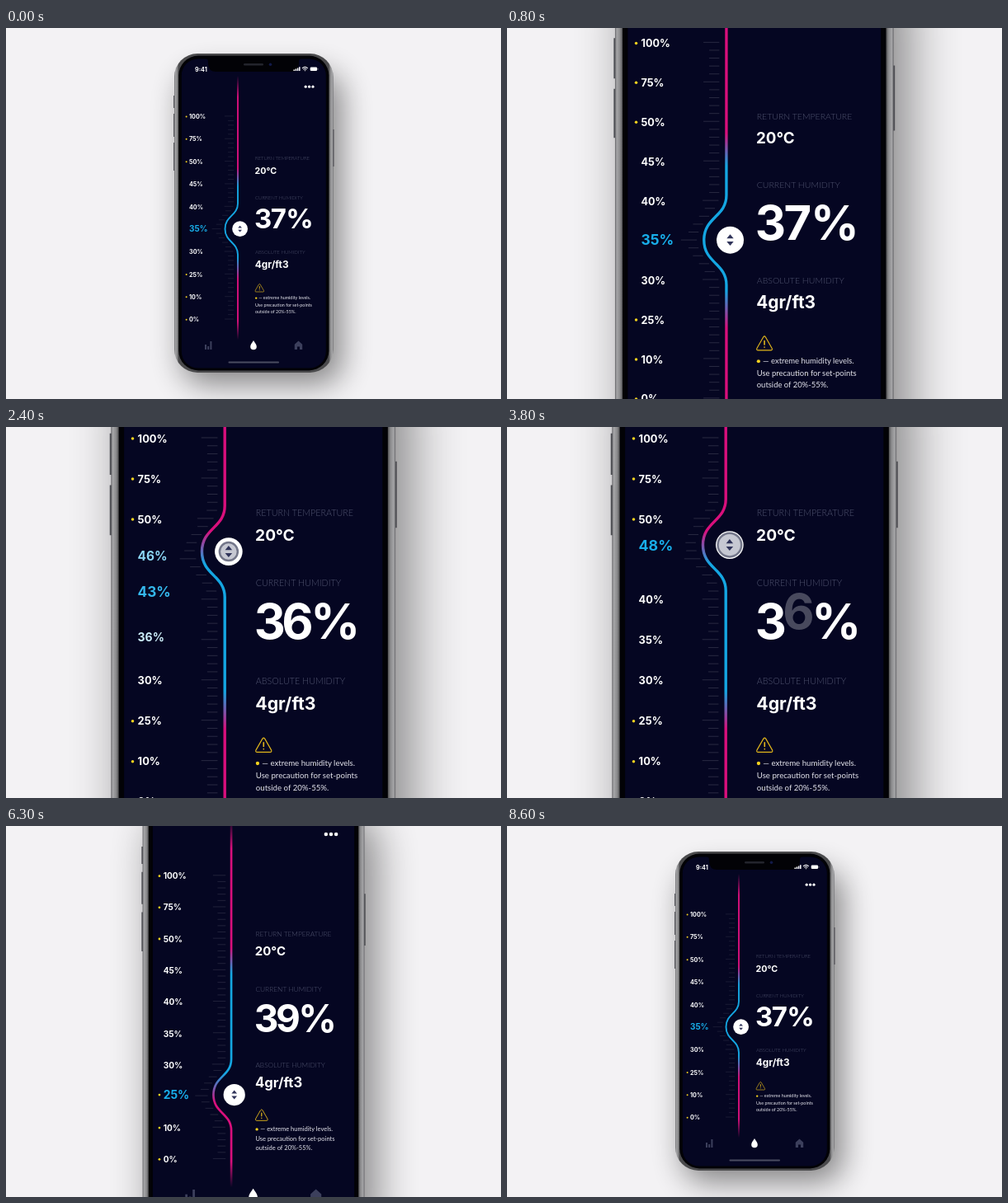
Write an HTML page that moves like this. It is 600x450 px and loops after 9 s.

```html
<!DOCTYPE html>
<html lang="en">
<head>
<meta charset="utf-8">
<title>Humidity control</title>
<style>
  html, body { margin: 0; width: 100%; height: 100%; overflow: hidden; background: #f3f2f4; }
  svg { display: block; width: 100vw; height: 100vh; }
  text { font-family: Inter, sans-serif; font-weight: 700; fill: #fff; }
  .cap { font: 300 6px Lato, sans-serif; fill: #50546f; }
  .note { font: 400 5.4px Lato, sans-serif; fill: #e4e4ec; }
  .big { font-size: 33px; }
  .label { font-size: 7.2px; }
  .dim { fill: #3c3f5c; }
</style>
</head>
<body>
<svg viewBox="0 0 600 450">
  <defs>
    <linearGradient id="metal">
      <stop offset="0" stop-color="#626266"/>
      <stop offset=".006" stop-color="#a6a6a8"/>
      <stop offset=".018" stop-color="#8a8a8c"/>
      <stop offset=".028" stop-color="#4a4a4c"/>
      <stop offset=".972" stop-color="#4a4a4c"/>
      <stop offset=".982" stop-color="#8a8a8c"/>
      <stop offset=".994" stop-color="#a6a6a8"/>
      <stop offset="1" stop-color="#626266"/>
    </linearGradient>
    <linearGradient id="heat" gradientUnits="userSpaceOnUse" x1="0" y1="58" x2="0" y2="378">
      <stop offset="0" stop-color="#d90f7c" stop-opacity="0"/>
      <stop offset=".08" stop-color="#d90f7c"/>
      <stop offset=".35" stop-color="#d90f7c"/>
      <stop offset=".42" stop-color="#14a6e2"/>
      <stop offset=".69" stop-color="#14a6e2"/>
      <stop offset=".77" stop-color="#d90f7c"/>
      <stop offset=".93" stop-color="#d90f7c"/>
      <stop offset="1" stop-color="#d90f7c" stop-opacity="0"/>
    </linearGradient>
    <filter id="blur" x="-50%" y="-30%" width="200%" height="160%">
      <feGaussianBlur stdDeviation="18"/>
    </filter>
  </defs>
  <rect width="600" height="450" fill="#f3f2f4"/>
  <g id="camera">
    <rect x="213" y="54" width="194" height="378" rx="28" fill="#000" opacity=".45" filter="url(#blur)"/>
    <path d="M203.8 82v15M203.8 104v28M203.8 139v34M396.8 123v45" stroke="#4c4d52" stroke-width="1.4"/>
    <rect x="204" y="31" width="192.6" height="387" rx="28" fill="url(#metal)"/>
    <rect x="209.2" y="33.6" width="182.2" height="381.8" rx="24" fill="#020206"/>
    <rect x="212.8" y="37.5" width="175" height="375" rx="20" fill="#050622"/>
    <path d="M241 37h118q-4 0-4 4v2q0 10-10 10h-90q-10 0-10-10v-2q0-4-4-4z" fill="#020206"/>
    <rect x="288" y="43" width="24" height="2.4" rx="1.2" fill="#23242c"/>
    <circle cx="320.5" cy="44.2" r="1.8" fill="#121a48"/>

    <text x="229" y="52.6" font-size="7.2">9:41</text>
    <path d="M349.2 52v-1.6M351.4 52v-2.6M353.6 52v-3.6M355.8 52v-4.8" stroke="#fff" stroke-width="1.5"/>
    <path d="M359 48.9q3.4-3 6.8 0M360.4 50.4q2-1.7 4 0M361.9 51.6h1" fill="none" stroke="#fff" stroke-width="1.1"/>
    <rect x="368.7" y="47.4" width="8.4" height="4.6" rx="1.3" fill="#fff"/>
    <path d="M378 48.9v1.7" stroke="#aaa" stroke-width=".7"/>
    <g fill="#fff">
      <circle cx="363.2" cy="71.2" r="1.6"/><circle cx="367.6" cy="71.2" r="1.6"/><circle cx="372" cy="71.2" r="1.6"/>
    </g>

    <path id="ticks" fill="none" stroke="#fff" stroke-opacity=".16" stroke-width=".5"/>
    <path id="line" fill="none" stroke="url(#heat)" stroke-width="1.9"/>
    <g id="labels"></g>
    <g id="handle">
      <circle r="9.4" fill="#fff"/>
      <circle id="press" fill="#c6c8d2" stroke="#74778a"/>
      <path d="M-2.4-1.1L0-3.9L2.4-1.1zM-2.4 1.1L0 3.9L2.4 1.1z" fill="#30345a"/>
    </g>

    <text class="cap" x="302" y="160.1">RETURN TEMPERATURE</text>
    <text x="301.6" y="176.8" font-size="10.7">20°C</text>
    <text class="cap" x="302" y="207.7">CURRENT HUMIDITY</text>
    <text class="big" x="300.9" y="243.4">3</text>
    <text class="big" id="digit" x="330.3" text-anchor="middle"></text>
    <text class="big" x="339.2" y="243.4">%</text>
    <text class="cap" x="302" y="273.9">ABSOLUTE HUMIDITY</text>
    <text x="301.7" y="291.2" font-size="11.9">4gr/ft3</text>
    <g fill="none" stroke="#e2b71b" stroke-width=".65" stroke-linejoin="round" stroke-linecap="round">
      <path d="M306.5 310.9q.8-1.2 1.600 0l4.400 7.700q.5 1.300-.8 1.400h-8.800q-1.300-.1-.8-1.400z"/>
      <path d="M307.300 313.500v2.600M307.300 317.800v.1" stroke-width=".9"/>
    </g>
    <circle cx="303.200" cy="327.600" r="1.200" fill="#f4d21f"/>
    <text class="note" x="306.200" y="329.200">— extreme humidity levels.</text>
    <text class="note" x="302" y="337.600">Use precaution for set-points</text>
    <text class="note" x="302" y="345.900">outside of 20%-55%.</text>

    <path class="dim" d="M241 384h2v6h-2zM244.200 386h2v4h-2zM247.400 380h2v10h-2z"/>
    <path d="M300 379c2 3.200 3.800 5 3.800 7.400a3.800 3.800 0 0 1-7.600 0c0-2.400 1.800-4.200 3.800-7.400z" fill="#fff"/>
    <path class="dim" d="M354.500 379.600l4.700 4.200v6.200h-3.200v-3.600h-3v3.600h-3.200v-6.200z"/>
    <rect x="269.500" y="404.600" width="61.500" height="1.800" rx=".9" fill="#4a4c60"/>
  </g>
</svg>
<script>
const LOOP = 9000, STEP = 100, LAST = 8600;
const TOP = 107.5, GAP = 27.35, HALF = GAP / 2;
const LINE_X = 281, REACH = 31, DEPTH = 15.5;
const DRAG_MS = 1350, ZOOM_MS = 1035, ZOOM = 0.79;
const VALUES = [100, 75, 50, 45, 40, 35, 30, 25, 10, 0];
const DRAGS = [
  { start: 1400, from: 243.7, to: 179.6, tau: 280 },
  { start: 3900, from: 179.6, to: 297.6, tau: 440 },
  { start: 6950, from: 297.6, to: 243.7, tau: 200 }
];
const DIGITS = [
  { start: 1350, from: 7, to: 6 },
  { start: 3600, from: 6, to: 9 },
  { start: 7450, from: 9, to: 7 }
];

const $ = id => document.getElementById(id);
const clamp = (v, lo = 0, hi = 1) => Math.min(hi, Math.max(lo, v));
const smooth = v => (v = clamp(v), v * v * (3 - 2 * v));
const ease = v => (v = clamp(v), v < .5 ? 4 * v ** 3 : 1 - 4 * (1 - v) ** 3);
const unease = p => p < .5 ? Math.cbrt(p / 4) : 1 - Math.cbrt((1 - p) / 4);
const mix = (a, b, k) => a + (b - a) * k;

const labels = VALUES.map((value, i) => {
  const g = document.createElementNS("http://www.w3.org/2000/svg", "g");
  const outer = value >= 50 || value <= 25;
  g.innerHTML = (outer ? '<circle cx="218.6" r="1" fill="#f4d21f"/>' : "") +
    '<text class="label" y="2.6"></text>';
  $("labels").append(g);
  return { g, text: g.lastChild, value, rest: TOP + i * GAP };
});

// Moment at which a drag passes height y
function crossing(drag, y) {
  const p = (y - drag.from) / (drag.to - drag.from);
  return p <= 0 ? -1e9 : p >= 1 ? 1e9 : drag.start + DRAG_MS * unease(p);
}

function drawLabel({ g, text, value, rest }, drag, t, y) {
  const dir = Math.sign(drag.to - drag.from);
  const enter = crossing(drag, rest - dir * HALF);
  const leave = crossing(drag, rest + dir * HALF);
  const rise = smooth((t - enter) / 520);
  const glow = rise * (1 - smooth((t - leave - 150) / 500));
  const pull = clamp(y - rest, -HALF, HALF);
  const shift = pull * rise * Math.exp(-Math.max(0, t - leave) / drag.tau);
  const change = clamp(-pull / HALF * 4.2, -3, 3) * glow;
  g.setAttribute("transform", `translate(0 ${rest + shift})`);
  text.textContent = Math.round(value + change) + "%";
  text.setAttribute("transform", `translate(222 0) scale(${1 + .38 * glow})`);
  text.style.fill = `rgb(${mix(255, 24, glow)},${mix(255, 174, glow)},${mix(255, 234, glow)})`;
}

function drawTrack(y) {
  $("line").setAttribute("d", `M${LINE_X} 58V${y - REACH}` +
    `c0 15 ${-DEPTH} 15 ${-DEPTH} ${REACH}s${DEPTH} 16 ${DEPTH} ${REACH}V378`);
  let d = "";
  for (let i = 0; i <= 45; i++) {
    const ty = TOP - .6 + i * GAP / 5;
    const k = clamp((ty - y) / REACH, -1, 1);
    const x = LINE_X - 4.9 - DEPTH * (1 + Math.cos(Math.PI * k)) / 2;
    d += `M${x} ${ty}h${i % 5 ? -7 : -11}`;
  }
  $("ticks").setAttribute("d", d);
}

function drawDigit(t) {
  const c = DIGITS.filter(e => e.start <= t).pop() || { start: -LOOP, to: 7 };
  const p = (t - c.start) / 300, dir = c.to > c.from ? 1 : -1;
  const leaving = p < 1;
  const away = leaving ? p : 1 - smooth(p - 1);
  $("digit").textContent = leaving ? c.from : c.to;
  $("digit").setAttribute("y", 243.4 + dir * away * 10.5 * (leaving ? -1 : 1));
  $("digit").setAttribute("opacity", (1 - away) ** 1.2);
}

function draw(t) {
  const zoom = 1 + ZOOM * (ease(t / ZOOM_MS) - ease((t - 5783) / ZOOM_MS));
  $("camera").setAttribute("transform",
    `translate(301 225.8) scale(${zoom}) translate(-301 -225.8)`);

  let drag = DRAGS.filter(d => d.start <= t).pop(), time = t;
  if (!drag) { drag = DRAGS[2]; time += LOOP; }
  const y = mix(drag.from, drag.to, ease((time - drag.start) / DRAG_MS));

  drawTrack(y);
  labels.forEach(l => drawLabel(l, drag, time, y));
  drawDigit(t);

  const press = smooth((t - 1300) / 1600) - smooth((t - 5200) / 700);
  $("handle").setAttribute("transform", `translate(283.6 ${y})`);
  $("press").setAttribute("r", 8 * press);
  $("press").setAttribute("stroke-width", Math.min(1.4, press * 3));
  $("press").setAttribute("opacity", clamp(press * 3));
}

const begin = performance.now();
function tick() {
  const t = (performance.now() - begin) % LOOP;
  draw(Math.min(LAST, Math.floor(t / STEP) * STEP));
  requestAnimationFrame(tick);
}
tick();
</script>
</body>
</html>
```
